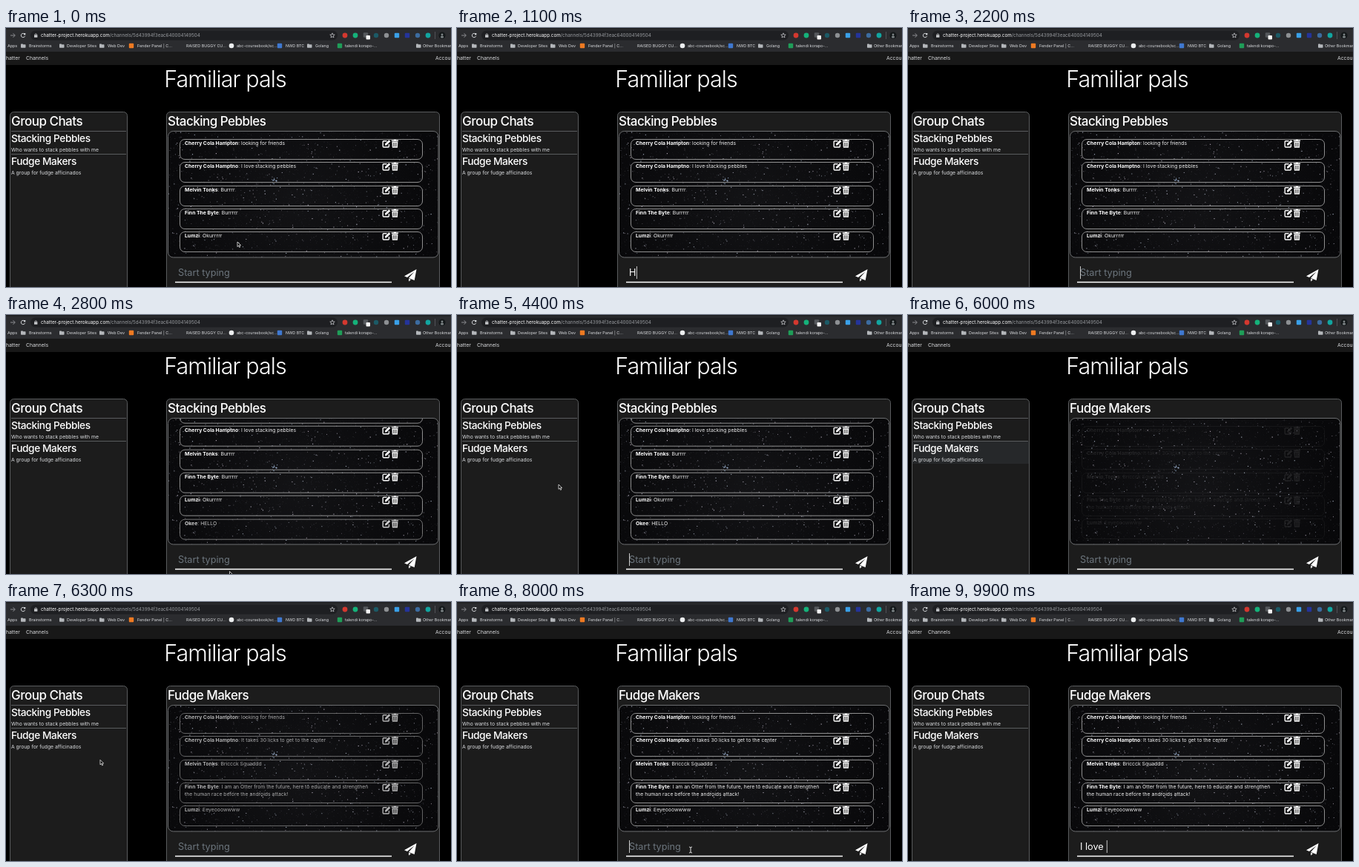
Animation, 600 px wide and 350 px high, one loop 10 s. Source, as an HTML page with a canvas:

```html
<!DOCTYPE html>
<html lang="en">
<head>
<meta charset="utf-8">
<title>Group chat</title>
<style>
html, body { margin: 0; width: 100%; height: 100%; overflow: hidden; background: #000; }
#stage { position: relative; width: 600px; height: 350px; overflow: hidden;
  font-family: Inter, "Liberation Sans", sans-serif; color: #fff; }
canvas { position: absolute; left: 0; top: 0; }
.t { position: absolute; white-space: pre; line-height: 20px; }
.h { font-weight: 500; letter-spacing: -.03em; }
#hover { position: absolute; left: 6px; top: 171px; width: 157px; height: 30px; background: #26282a; }
#list { position: absolute; left: 219px; top: 140px; width: 364px; height: 170px; overflow: hidden; border-radius: 7px; }
.row { position: absolute; left: 15px; width: 326px; height: 26px; border: 1px solid #8e8e8e; border-radius: 7px; }
.row p { position: absolute; left: 6px; top: 0; margin: 0; font-size: 6.85px; line-height: 10.4px;
  white-space: pre; color: #eee; }
.row b { color: #fff; }
.row svg { position: absolute; left: 272px; top: -1px; }
</style>
</head>
<body>
<div id="stage">
  <canvas id="back" width="600" height="350"></canvas>
  <div id="hover"></div>
  <div id="list"></div>
  <div id="labels"></div>
  <canvas id="front" width="600" height="350"></canvas>
</div>
<script>
const $ = id => document.getElementById(id);
const LOOP = 10000, STEP = 100, PITCH = 31.3;

function label(x, y, text, size, color = '#fff', cls = '') {
  const s = document.createElement('span');
  s.className = 't ' + cls;
  s.textContent = text;
  s.style.cssText = `left:${x}px;top:${y - 10}px;font-size:${size}px;color:${color}`;
  $('labels').append(s);
  return s;
}

/* ---------- static shapes ---------- */
const g = $('back').getContext('2d');

function rect(x, y, w, h, r, fill, stroke) {
  g.beginPath();
  g.roundRect(x, y, w, h, r);
  if (fill) { g.fillStyle = fill; g.fill(); }
  if (stroke) { g.strokeStyle = stroke; g.lineWidth = 1; g.stroke(); }
}
function dot(x, y, r, fill) {
  g.beginPath();
  g.arc(x, y, r, 0, 7);
  g.fillStyle = fill;
  g.fill();
}
function line(color, width, ...p) {
  g.beginPath();
  for (let i = 0; i < p.length; i += 2) g.lineTo(p[i], p[i + 1]);
  g.strokeStyle = color;
  g.lineWidth = width;
  g.stroke();
}
function folder(x) {
  rect(x - 3, 21.5, 3, 2, .5, '#b4b7bb');
  rect(x - 3, 22.3, 6.5, 4.4, .7, '#b4b7bb');
}
const square = (x, y, fill) => rect(x - 3.2, y - 3.2, 6.4, 6.4, 1, fill);

function drawBrowser() {
  rect(0, 0, 600, 32, 0, '#2b2c2f');
  rect(0, 0, 600, 1.5, 0, '#1c1d1f');
  rect(33, 3.5, 414, 13, 6.5, '#1e1f22');
  line('#8b8d91', 1, 6, 10, 12, 10);
  line('#8b8d91', 1, 9.5, 7.2, 12.3, 10, 9.5, 12.8);
  g.beginPath();
  g.arc(23, 10, 2.7, .3, 5.4);
  g.strokeStyle = '#d0d2d5';
  g.stroke();
  rect(24, 7, 2.3, 2.3, 0, '#d0d2d5');
  rect(38, 9.3, 4.4, 3.5, .5, '#c4c6c9');
  g.beginPath();
  g.arc(40.2, 9.2, 1.4, Math.PI, 0);
  g.strokeStyle = '#c4c6c9';
  g.lineWidth = .8;
  g.stroke();
  g.beginPath();
  for (let i = 0; i < 10; i++) {
    const a = i * Math.PI / 5 - Math.PI / 2, r = i % 2 ? 1.5 : 3.4;
    g.lineTo(440 + r * Math.cos(a), 10.2 + r * Math.sin(a));
  }
  g.closePath();
  g.stroke();

  // extension buttons
  dot(457, 10, 3.4, '#d3382f');
  dot(471, 10, 3.4, '#15b27a');
  square(485, 9.5, '#55585c');
  rect(485.5, 10, 5.5, 5.5, 1, '#f4f4f4');
  dot(499, 10, 3.2, '#1c5a66');
  dot(513, 10, 3.2, '#8d9093');
  square(527, 10, '#3aa0e8');
  square(541, 10, '#24349a');
  dot(555, 10, 3.2, '#3c6ca0');
  dot(569, 10, 3.4, '#12a5a0');
  line('#505256', 1, 578.5, 5, 578.5, 15);
  dot(588, 10, 4.5, '#14181a');
  dot(588, 9, 1.4, '#7d8486');
  rect(586, 10.8, 4, 2.8, 1.4, '#7d8486');

  // bookmark icons
  [23, 75, 129, 409, 556].forEach(folder);
  square(169, 24, '#ee7a22');
  dot(304, 24, 3.3, '#eceeef');
  square(369, 24, '#3f78d0');
  square(450, 24, '#1f9d58');
}

function drawStars() {
  let seed = 7;
  const rnd = () => (seed = seed * 16807 % 2147483647) / 2147483647;
  g.save();
  rect(218.5, 139.5, 364, 170.5, 7, '#08080a');
  g.clip();
  const glow = g.createRadialGradient(390, 235, 10, 390, 235, 190);
  glow.addColorStop(0, 'rgba(140,142,150,.08)');
  glow.addColorStop(1, 'rgba(140,142,150,0)');
  g.fillStyle = glow;
  g.fillRect(218, 139, 366, 172);
  for (let i = 0; i < 2800; i++) {
    const b = Math.pow(rnd(), 6);
    const s = .7 + b * .5;
    g.fillStyle = `rgba(${195 + rnd() * 35},212,230,${.1 + .7 * b})`;
    g.fillRect(219 + rnd() * 364, 140 + rnd() * 170, s, s);
  }
  for (let i = 0; i < 14; i++)
    dot(362 + (rnd() - .5) * 8, 208 + (rnd() - .5) * 11, .4 + rnd() * .5, 'rgba(185,210,245,.75)');
  g.restore();
  rect(218.5, 139.5, 364.5, 170.5, 7, null, '#6c6e70');
}

function drawPage() {
  rect(0, 32, 600, 18, 0, '#181818');
  rect(5.5, 113.5, 158, 260, 5, '#1c1c1c', '#5a5c5e');
  rect(216.5, 113.5, 368, 260, 5, '#1c1c1c', '#5a5c5e');
  line('#5a5c5e', 1, 7, 139.5, 162, 139.5);
  line('#5a5c5e', 1, 7, 170.5, 162, 170.5);
  drawStars();
  line('#fff', 1.6, 228, 343.5, 520, 343.5);
  // paper plane
  g.fillStyle = '#fff';
  g.fill(new Path2D('M553.5 326 L537 335.3 L541 337.1 L550.5 329.2 L543 338 L550.7 341 Z'));
  g.fill(new Path2D('M543 338.8 L546 340 L543 342.6 Z'));
}

drawBrowser();
drawPage();

/* ---------- static text ---------- */
const pale = '#dcdee1';
label(47, 10, 'chatter-project.herokuapp.com', 6.3).insertAdjacentHTML('beforeend',
  '<span style="color:#9a9da1">/channels/5d43994f3eac640004149504</span>');
[[2, 'Apps'], [31, 'Brainstorms'], [82, 'Developer Sites'], [137, 'Web Dev'],
 [177, 'Fender Panel | C…'], [243, 'RAISED BUGGY CU…'], [311, 'abc-coursebook/sc…'],
 [377, 'NWD BTC'], [417, 'Golang'], [457, 'talendi korapo-…'], [562, 'Other Bookmarks']]
  .forEach(([x, s]) => label(x, 24, s, 5.4, pale));
label(-5, 41.2, 'Chatter', 6.8, pale);
label(27, 41.2, 'Channels', 6.8, pale);
label(579, 41.2, 'Account', 6.8, pale);
const head = label(0, 69, 'Familiar pals', 30.5);
head.style.cssText += 'width:591px;text-align:center;font-weight:300;letter-spacing:-.03em';

const rooms = ['Stacking Pebbles', 'Fudge Makers'];
label(7, 126, 'Group Chats', 17, '#fff', 'h');
label(7, 148.5, rooms[0], 13.7, '#fff', 'h');
label(7, 165, 'Who wants to stack pebbles with me', 6.8, pale);
label(7, 179.5, rooms[1], 13.7, '#fff', 'h');
label(7, 196, 'A group for fudge afficinados', 6.8, pale);
const title = label(218, 126, '', 17, '#fff', 'h');
const field = label(232, 331, '', 12.7);

/* ---------- messages ---------- */
const people = ['Cherry Cola Hampton', 'Cherry Cola Hamptno', 'Melvin Tonks', 'Finn The Byte', 'Lumzi', 'Okee'];
const chats = [
  ['looking for friends', 'I love stacking pebbles', 'Burrrr', 'Burrrrr', 'Okurrrrr', 'HELLO'],
  ['looking for friends', 'It takes 30 licks to get to the center', 'Briccck Squaddd',
   'I am an Otter from the future, here to educate and strengthen\nthe human race before the androids attack!',
   'Eeyeooowwww']
];
const icons = `<svg width="23" height="13" viewBox="0 0 23 13">
<path d="M6.5 2.7H2.2Q1.2 2.7 1.2 3.7V10Q1.2 11 2.2 11H8.4Q9.4 11 9.4 10V7" fill="none" stroke="#fff" stroke-width="1.4"/>
<path d="M4.3 6.3L9.3 1.3L11.3 3.3L6.3 8.3L4 8.7Z" fill="#fff"/>
<path d="M12.8 1.6H15.6L16.3 .8H18.6L19.3 1.6H22V2.9H12.8Z" fill="#fff"/>
<path d="M13.4 3.6H21.4L20.9 11.8H13.9Z" fill="#fff"/>
<path d="M15.5 5V10.4M17.4 5V10.4M19.3 5V10.4" stroke="#222" stroke-width=".8"/></svg>`;

const groups = chats.map(chat => {
  const box = document.createElement('div');
  chat.forEach((text, i) => {
    const row = document.createElement('div');
    row.className = 'row';
    row.style.top = 10 + PITCH * i + 'px';
    row.innerHTML = `<p><b>${people[i]}</b>: ${text}</p>${icons}`;
    box.append(row);
  });
  $('list').append(box);
  return box;
});
const newest = groups[0].lastChild;

/* ---------- timeline ---------- */
const path = [
  [0, 312, 289], [100, 311, 293], [400, 304, 337], [500, 302, 341], [600, 301.5, 336.5], [700, 301.5, 336.5],
  [800, 301.5, 332.5], [2400, 301.5, 333], [2800, 301.5, 346.5], [3000, 299, 345], [3300, 284, 325],
  [3500, 270, 312], [3900, 215, 278], [4200, 166, 248], [4400, 137, 229], [4500, 96, 207], [4700, 73, 190],
  [4900, 73, 190], [5300, 84, 216], [5700, 81.5, 181], [6200, 81.5, 181], [6700, 309, 343],
  [6900, 315, 335], [LOOP, 315, 335]
];
const typed = [
  [0, ''], [1000, 'H'], [1400, 'HE'], [1500, 'HEL'], [1700, 'HELL'], [1900, 'HELLO'], [2100, ''],
  [9000, 'I'], [9300, 'I '], [9500, 'I lov'], [9800, 'I love'], [9900, 'I love ']
];
// start and end of each spell of focus
const focus = [[600, 4900], [2100, 4900], [7000, LOOP]];

const within = (v, a, b) => v >= a && v < b;
const last = (list, t) => list.filter(e => e[0] <= t).pop();

// CSS "ease" curve
function ease(p) {
  if (p <= 0) return 0;
  if (p >= 1) return 1;
  let lo = 0, hi = 1, u;
  for (let i = 0; i < 20; i++) {
    u = (lo + hi) / 2;
    const x = .75 * u * (1 - u) * (1 - u) + .75 * u * u * (1 - u) + u * u * u;
    x < p ? lo = u : hi = u;
  }
  return .3 * u * (1 - u) * (1 - u) + 3 * u * u * (1 - u) + u * u * u;
}

function pointer(t) {
  const i = path.findIndex(p => p[0] > t);
  const [t0, x0, y0] = path[i - 1], [t1, x1, y1] = path[i];
  const k = (t - t0) / (t1 - t0);
  return [x0 + (x1 - x0) * k, y0 + (y1 - y0) * k];
}

const f = $('front').getContext('2d');

function drawPointer(x, y) {
  const overField = within(x, 228, 520) && within(y, 322, 344);
  const overName = within(x, 7, 92) && within(y, 174, 186);
  if (overField || overName) {
    f.strokeStyle = '#e4e4e4';
    f.lineWidth = 1;
    f.stroke(new Path2D(`M${x - 2} ${y - 4}Q${x} ${y - 4} ${x} ${y - 2.5}V${y + 2.5}Q${x} ${y + 4} ${x - 2} ${y + 4}
      M${x + 2} ${y - 4}Q${x} ${y - 4} ${x} ${y - 2.5}M${x} ${y + 2.5}Q${x} ${y + 4} ${x + 2} ${y + 4}`));
    return;
  }
  const arrow = new Path2D(`M${x} ${y}v6.4l1.5-1.4l1.1 2.5l1.1-.5l-1.1-2.4h2Z`);
  f.fillStyle = '#000';
  f.strokeStyle = '#eee';
  f.lineWidth = .8;
  f.fill(arrow);
  f.stroke(arrow);
}

function render(t) {
  const room = t < 5900 ? 0 : 1;
  title.textContent = rooms[room];
  groups.forEach((box, i) => box.style.display = i === room ? 'block' : 'none');
  groups[0].style.transform = `translateY(${t < 2400 ? 0 : -PITCH}px)`;
  newest.style.opacity = ease((t - 2300) / 1000);
  groups[1].style.opacity = ease((t - 5900) / 1000);

  const [x, y] = pointer(t);
  $('hover').style.display = within(y, 171, 201) && x < 163 ? 'block' : 'none';

  const [since, text] = last(typed, t);
  field.textContent = text || 'Start typing';
  field.style.color = text ? '#fff' : '#6c757d';

  f.clearRect(0, 0, 600, 350);
  const on = last(focus, t);
  if (on && t < on[1]) {
    const from = Math.max(on[0], since);
    if (Math.floor((t - from) / 500) % 2 === 0) {
      const end = text ? field.getBoundingClientRect().width + .5 : 0;
      f.fillStyle = '#c8c8c8';
      f.fillRect(232 + end, 322, 1, 17);
    }
  }
  if (!within(t, 1000, 2400) && t < 9000) drawPointer(x, y);
}

function tick() {
  render(Math.floor(performance.now() % LOOP / STEP) * STEP);
  requestAnimationFrame(tick);
}
tick();
</script>
</body>
</html>
```
